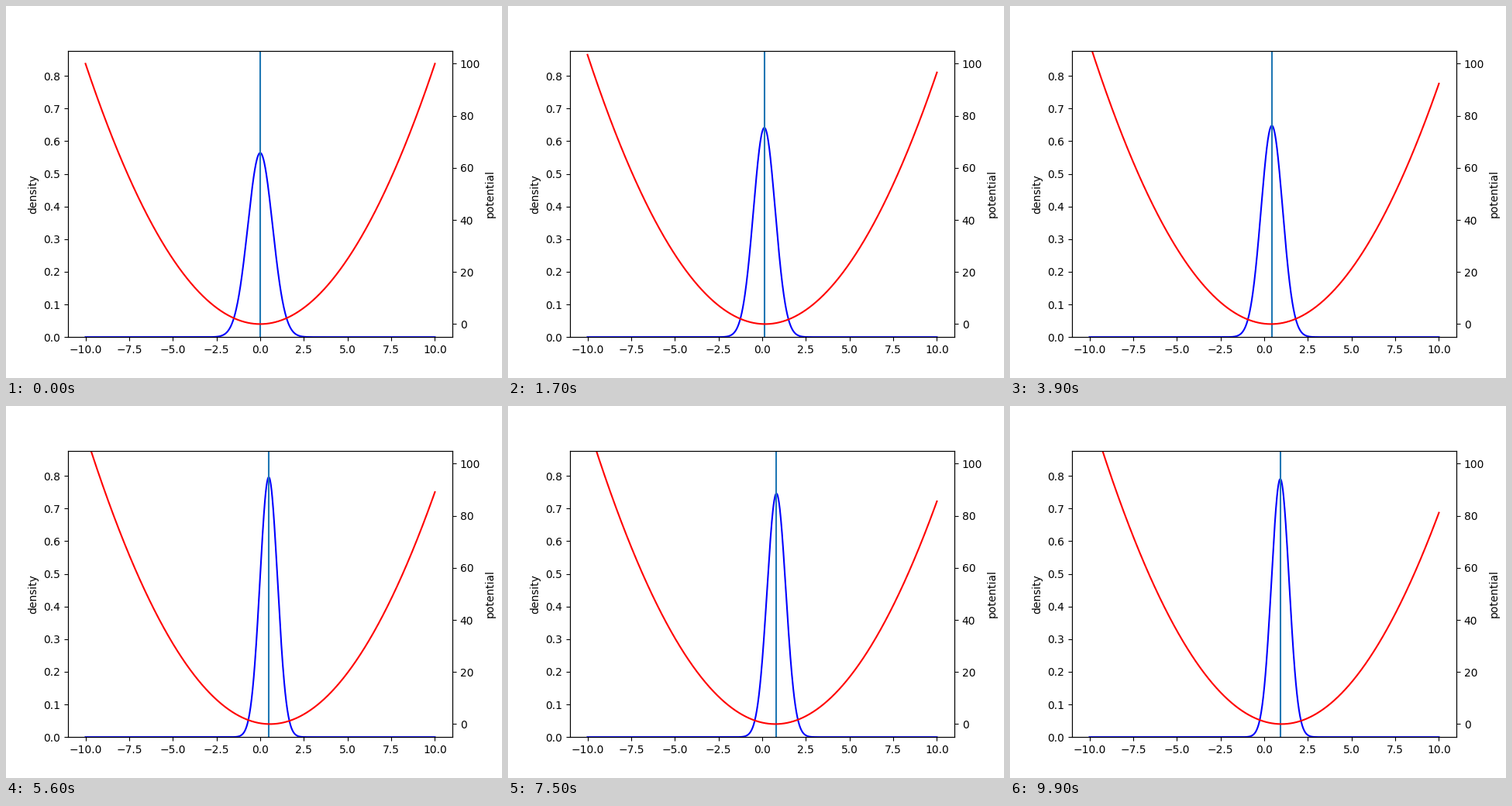
Recreate the animation shown at these times as a matplotlib script. Size 640 by 480 pixels, loop 10000 ms.

```python
import numpy as np
import matplotlib.pyplot as plt
from matplotlib.animation import FuncAnimation

FRAMES = 100
DT = 0.1
SPEED = 0.1           # drift of the trap's centre
OMEGA = np.sqrt(2)    # H = p^2 / 2 + (x - SPEED * t)^2

x = np.linspace(-10, 10, 1000)


def mean(t):
    """Centre of the packet, lagging behind the moving trap."""
    return SPEED * (t - np.sin(OMEGA * t) / OMEGA)


def density(t):
    """Breathing Gaussian packet, started with unit width."""
    w2 = np.cos(OMEGA * t) ** 2 + np.sin(OMEGA * t) ** 2 / OMEGA ** 2
    return np.exp(-(x - mean(t)) ** 2 / w2) / np.sqrt(np.pi * w2)


def potential(t):
    return (x - SPEED * t) ** 2


fig, ax = plt.subplots(figsize=(6.4, 4.8), dpi=100)
ax.set_xlim(-11, 11)
ax.set_ylim(0, 1.1 * max(density(i * DT).max() for i in range(FRAMES)))
ax.set_ylabel("density")
packet, = ax.plot(x, density(0), "b")
marker = ax.axvline(0)

ax2 = ax.twinx()
ax2.set_ylim(-5, 105)
ax2.set_ylabel("potential")
trap, = ax2.plot(x, potential(0), "r")


def update(i):
    t = i * DT
    packet.set_ydata(density(t))
    trap.set_ydata(potential(t))
    marker.set_xdata([mean(t)] * 2)
    return packet, trap, marker


anim = FuncAnimation(fig, update, frames=FRAMES, interval=100, repeat=True)
plt.show()
```
